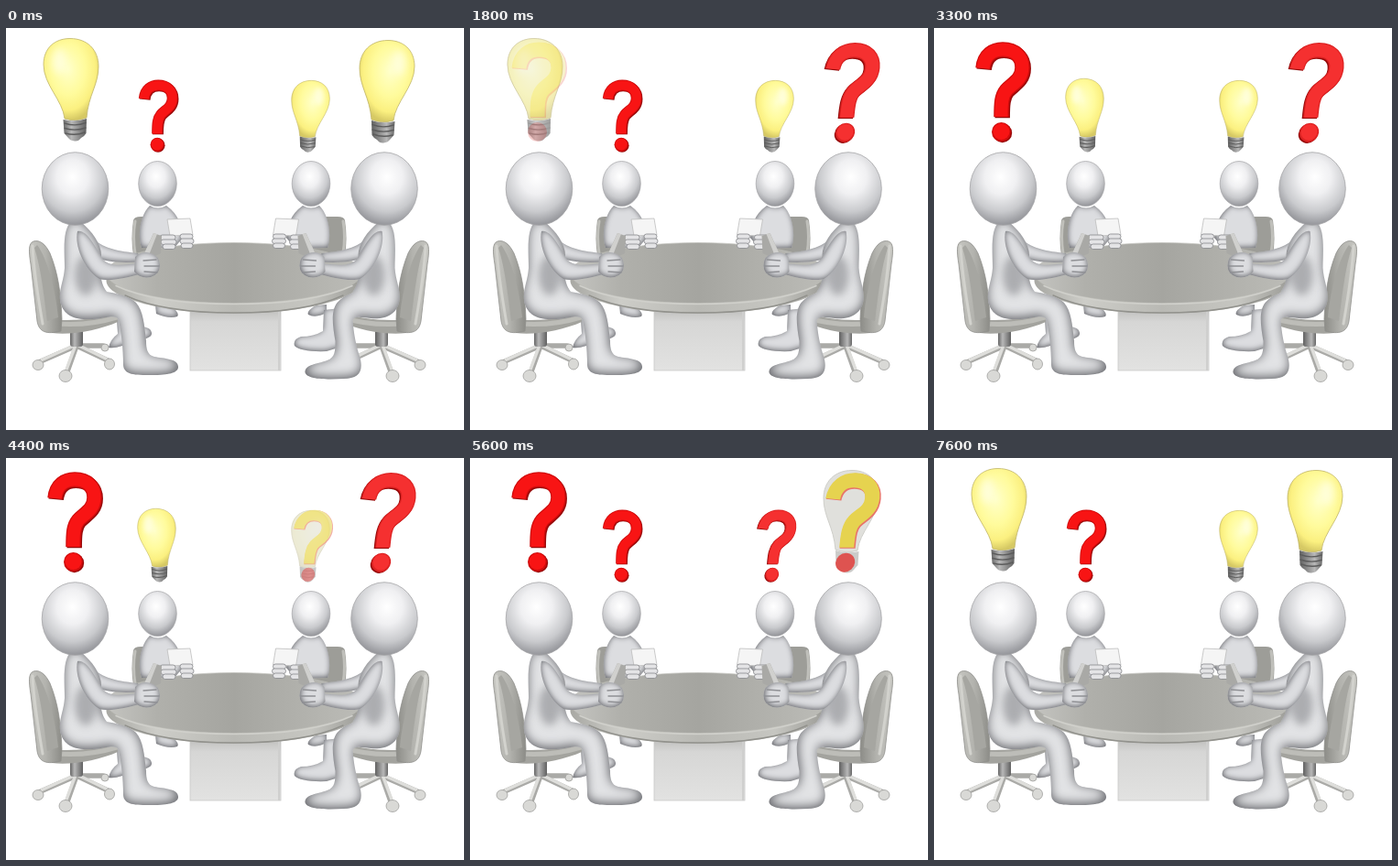
An HTML page that plays this animation: 500 by 439 pixels, repeating every 8600 ms.

```html
<!DOCTYPE html>
<html lang="en">
<head>
<meta charset="utf-8">
<title>Meeting</title>
<style>
html, body { margin: 0; width: 100%; height: 100%; overflow: hidden; background: #fff; }
svg { display: block; width: 100vw; height: 100vh; }
.skin { fill: #e2e3e5; filter: url(#round); }
.small { fill: #dcdde0; filter: url(#roundS); }
.line { fill: none; stroke-linecap: round; }
.fingers { fill: #e4e4e6; stroke: #8f9094; stroke-width: .9; }
.left { --red: #f81414; --edge: #d00c0c; --dx: 1.2px; }
.right { --red: #f53030; --edge: #dc2222; --dx: -1.2px; }
.depth { transform: translate(var(--dx), 1.2px); }
</style>
</head>
<body>
<svg viewBox="0 0 500 439">
<defs>
  <!-- inner shading that makes flat shapes look round -->
  <filter id="round" x="-10%" y="-10%" width="120%" height="120%" color-interpolation-filters="sRGB">
    <feGaussianBlur in="SourceAlpha" stdDeviation="6"/>
    <feOffset dx="-1" dy="-2" result="b"/>
    <feFlood flood-color="#5a5b60"/>
    <feComposite operator="out" in2="b"/>
    <feComposite operator="in" in2="SourceAlpha" result="e"/>
    <feMerge><feMergeNode in="SourceGraphic"/><feMergeNode in="e"/></feMerge>
  </filter>
  <filter id="roundS" x="-10%" y="-10%" width="120%" height="120%" color-interpolation-filters="sRGB">
    <feGaussianBlur in="SourceAlpha" stdDeviation="3"/>
    <feOffset dx="-.5" dy="-1.5" result="b"/>
    <feFlood flood-color="#5a5b60"/>
    <feComposite operator="out" in2="b"/>
    <feComposite operator="in" in2="SourceAlpha" result="e"/>
    <feMerge><feMergeNode in="SourceGraphic"/><feMergeNode in="e"/></feMerge>
  </filter>
  <filter id="blur" x="-60%" y="-60%" width="220%" height="220%"><feGaussianBlur stdDeviation="4"/></filter>
  <radialGradient id="head" cx=".46" cy=".34" r=".68">
    <stop stop-color="#fff"/><stop offset=".35" stop-color="#f0f0f2"/>
    <stop offset=".7" stop-color="#c9cacd"/><stop offset="1" stop-color="#8e8f94"/>
  </radialGradient>
  <radialGradient id="glass" cx=".45" cy=".38" r=".62">
    <stop stop-color="#ffffc8"/><stop offset=".5" stop-color="#fffb9c"/>
    <stop offset=".8" stop-color="#fbf080"/><stop offset="1" stop-color="#d6c964"/>
  </radialGradient>
  <linearGradient id="metal">
    <stop stop-color="#666"/><stop offset=".35" stop-color="#b8b8b8"/><stop offset="1" stop-color="#606060"/>
  </linearGradient>
  <linearGradient id="chair">
    <stop stop-color="#c6c6c1"/><stop offset=".5" stop-color="#b3b3ae"/><stop offset="1" stop-color="#8c8c87"/>
  </linearGradient>
  <linearGradient id="top">
    <stop stop-color="#c4c4c0"/><stop offset=".2" stop-color="#b0b0ab"/>
    <stop offset=".5" stop-color="#a5a5a0"/><stop offset="1" stop-color="#bcbcb7"/>
  </linearGradient>
  <linearGradient id="rim">
    <stop stop-color="#a8a8a3"/><stop offset=".2" stop-color="#cdcdc8"/><stop offset=".5" stop-color="#b9b9b4"/>
    <stop offset=".8" stop-color="#c6c6c1"/><stop offset="1" stop-color="#9c9c97"/>
  </linearGradient>
  <linearGradient id="post" x2="0" y2="1">
    <stop stop-color="#bdbdbb"/><stop offset=".22" stop-color="#d6d6d5"/><stop offset="1" stop-color="#e2e2e1"/>
  </linearGradient>

  <path id="outline" d="M70 11.500C89 11.500 101 24 101 42C101 62 90 73 88 98Q76 103 64 99C62 79 41 62 41 40C41 22 53 11.500 70 11.500Z"/>
  <path id="screw" d="M62.500 100Q76 103 88 99L87.500 115Q85 119 82 120Q79 124 75 123.500Q70 123 68 120L63.500 115Z"/>
  <path id="hook" d="M53.500 44C55 29 65 23.500 75 23.500C89 23.500 96.500 32 96.500 43C96.500 57 85 61 79 68C74 74 73.500 82 73.500 97"/>

  <g id="bulb">
    <use href="#outline" fill="url(#glass)" stroke="#bfb468" stroke-width=".8"/>
    <ellipse cx="58" cy="36" rx="8" ry="14" fill="#fffff0" opacity=".65" filter="url(#blur)"/>
    <use href="#screw" fill="url(#metal)"/>
    <path class="line" d="M64 104Q76 108 87 103.500M64 109.500Q76 113 87 109M65 115Q76 118 86 114" stroke="#5c5c5c" stroke-width="1.400"/>
  </g>
  <g id="ask">
    <g class="depth" fill="#970a0a" stroke="#970a0a">
      <use href="#hook" fill="none" stroke-width="16.500"/><circle cx="73.500" cy="113.500" r="10.500" stroke="none"/>
    </g>
    <use href="#hook" fill="none" stroke="var(--edge)" stroke-width="16.500"/>
    <use href="#hook" fill="none" stroke="var(--red)" stroke-width="14"/>
    <circle cx="73.500" cy="113.500" r="10.500" fill="var(--edge)"/><circle cx="73.500" cy="113" r="9" fill="var(--red)"/>
  </g>
  <g id="ghostBulb">
    <use href="#outline" fill="#e0e0dc" stroke="#cfcfca"/><use href="#screw" fill="#cbcbc9"/>
  </g>
  <g id="ghostAsk">
    <use href="#hook" fill="none" stroke="#e8746a" stroke-width="17" transform="translate(1 1)"/>
    <use href="#hook" fill="none" stroke="#e6d34f" stroke-width="16"/>
    <circle cx="73.500" cy="113.500" r="10.500" fill="#de5350"/>
  </g>

  <g id="backChair">
    <path d="M139 210Q140 206 147 206L176 206Q180 230 178 248L139 248Q136 230 139 210Z" fill="#9d9d98"/>
    <path d="M141 211Q138 228 141 246" class="line" stroke="#c0c0bb" stroke-width="3"/>
  </g>
  <g id="backBody" class="small">
    <path d="M157 194Q166 199 175 194Q185 201 189 211L193 229L183 241L148 240C143 226 147 203 157 194Z"/>
  </g>
  <g id="backHands">
    <path d="M176 209L201 208L204 226L179 227Z" fill="#f5f5f5" stroke="#bdbdbd" stroke-width=".8"/>
    <g class="fingers">
      <rect x="168" y="226" width="17" height="5.500" rx="2.700"/><rect x="169" y="231" width="17" height="5.500" rx="2.700"/>
      <rect x="171" y="236" width="14" height="5.500" rx="2.700"/><rect x="190" y="225" width="14" height="5.500" rx="2.700"/>
      <rect x="190" y="230" width="15" height="5.500" rx="2.700"/><rect x="191" y="235" width="13" height="5.500" rx="2.700"/>
    </g>
  </g>

  <g id="seat">
    <g class="line" stroke="#aaaaa7" stroke-width="5.500">
      <path d="M77 347L38 364M77 347L67 375M77 347L111 363M77 347L106 347"/>
      <path d="M76 346L39 362.500M76 346L66 373M78 346L110 361.500" stroke="#dededb" stroke-width="3.500"/>
    </g>
    <g fill="#d9d9d6" stroke="#a0a09d" stroke-width=".8">
      <ellipse cx="35" cy="368" rx="6" ry="5.500"/><ellipse cx="65" cy="380" rx="7" ry="6.500"/>
      <ellipse cx="113" cy="367" rx="5.500" ry="6"/><ellipse cx="108" cy="349" rx="4" ry="4"/>
    </g>
    <rect x="70" y="328" width="14" height="20" rx="3" fill="url(#metal)"/>
    <path d="M40 317C70 322 100 317 122 311L122 321C102 330 70 336 50 333Z" fill="#a3a39e"/>
    <path d="M46 322Q85 327 121 316" class="line" stroke="#bdbdb8" stroke-width="5"/>
    <path d="M30 233C24 235 25 245 27 258L34 320C36 332 44 335 60 331L61 318C60 290 57 268 48 246C43 236 37 231 30 233Z" fill="url(#chair)" stroke="#8f8f8b" stroke-width=".8"/>
    <path d="M34 237C43 248 54 282 57 316L45 320C41 288 38 262 31 240Z" fill="#a6a6a1"/>
    <path d="M29 238C30 262 36 300 40 323" class="line" stroke="#d2d2cd" stroke-width="3"/>
  </g>
  <g id="farArm">
    <path class="small" d="M92 226C102 239 116 243 144 246L148 255C130 257 110 256 96 250Z"/>
    <path d="M161 224L170 227L169 246L157 252L151 246Z" fill="#a9a9a6"/>
    <path d="M161 224L165 225L156 248L151 246Z" fill="#d0d0ce"/>
  </g>
  <path id="torso" d="M72 211C61 219 64 244 64 262C63 278 56 288 60 302C66 318 92 317 106 312L110 288C102 278 102 262 104 248C104 236 94 222 82 212Z"/>
  <g id="upper">
    <ellipse cx="87" cy="270" rx="12" ry="22" fill="#77787d" opacity=".5" filter="url(#blur)"/>
    <path class="small" d="M78 222C88 220 97 238 106 253C115 262 130 258 146 257L148 268C132 273 112 277 102 274C88 266 74 240 78 222Z"/>
    <path class="small" d="M141 250Q148 243 158 246Q168 249 168 259Q168 269 158 272Q146 274 140 266Z"/>
    <path class="line" d="M150 254L164 253M151 260L167 260M151 266L165 267" stroke="#8f9094" stroke-width="1.300"/>
    <ellipse cx="75.500" cy="175.500" rx="36.300" ry="39.800" fill="url(#head)" stroke="#a5a5a8" stroke-width=".8"/>
  </g>
</defs>

<rect width="500" height="439" fill="#fff"/>

<use href="#backChair"/><use href="#backChair" transform="matrix(-1 0 0 1 509 0)"/>
<use href="#backBody"/><use href="#backBody" transform="matrix(-1 0 0 1 499 0)"/>
<g fill="url(#head)" stroke="#a5a5a8" stroke-width=".7">
  <ellipse cx="165.500" cy="170" rx="20.800" ry="24.500"/><ellipse cx="333" cy="170" rx="20.800" ry="24.500"/>
</g>

<path class="small" d="M163 302L180 304Q190 311 187 315Q178 318 164 312Z"/>
<path class="small" d="M350 302L338 303Q328 309 330 313Q338 317 350 311Z"/>
<path class="small" d="M120 304L146 306L147 326Q160 327 159 334Q158 340 140 341Q122 351 112 349Q114 340 122 334Z"/>
<path class="small" d="M365 306L347 308L346 331Q336 337 322 337Q313 340 315 347Q322 354 350 353L366 348Z"/>
<rect x="201" y="306" width="99" height="68" fill="url(#post)" stroke="#c8c8c7" stroke-width=".8"/>
<path d="M298 308V374" stroke="#cfcfce" stroke-width="2"/>
<path d="M109.500 269V276C109.500 295 172 312 249 312S388.500 295 388.500 276V269Z" fill="url(#rim)"/>
<ellipse cx="249" cy="267.500" rx="139.500" ry="33" fill="url(#top)" stroke="#bdbdb8" stroke-width=".7"/>
<path d="M120 281.500C150 295.500 198 301.500 249 301.500S348 295.500 378 281.500" class="line" stroke="#d0d0cb" stroke-width="1.500"/>
<path d="M130 292C160 306 200 311 249 311S338 306 368 292" class="line" stroke="#92928d" stroke-width="1.500"/>
<use href="#backHands"/><use href="#backHands" transform="matrix(-1 0 0 1 495.500 0)"/>

<use href="#seat"/><use href="#farArm"/>
<g class="skin">
  <use href="#torso"/>
  <path d="M64 288C54 304 66 319 90 318C108 318 119 311 123 319C126 334 128 350 128 368C129 379 140 379 160 379C176 379 188 377 188 370C188 361 172 361 162 359C154 357 153 350 153 342C151 325 150 309 142 300C130 289 112 290 100 285Z"/>
</g>
<use href="#upper"/>

<g transform="matrix(-1 0 0 1 488.500 0)">
  <use href="#seat" x="1.500"/><use href="#farArm"/>
  <g class="skin">
    <use href="#torso"/>
    <path d="M64 288C54 304 66 319 90 317C102 316 107 314 110 319C109 334 106 348 102 360C98 376 104 383 120 383C138 384 160 384 162 376C162 367 148 367 138 363C129 360 129 352 129 342C132 325 134 309 127 300C118 290 110 290 100 285Z"/>
  </g>
  <use href="#upper"/>
</g>
<g id="icons"></g>
</svg>
<script>
// transforms per person: [bulb, question mark]
const places = [
  ['1 0 0 1 0 0', '1 0 0 1 0 0'],
  ['.694 0 0 .717 115.2 47', '.72 0 0 .72 112.2 45.6'],
  ['-.694 0 0 .7 381.8 49.3', '.71 0 -.06 .72 284.4 45.6'],
  ['-1 0 0 1 487 2', '1 0 -.093 1 346.7 .7']
];
const start = [1, 0, 1, 1];  // 1 = bulb, 0 = question mark
// [person, first step in ms, steps, new state]
const fades = [
  [3, 100, 8, 0], [0, 1800, 7, 0], [1, 2600, 8, 1], [2, 4300, 7, 0],
  [1, 5000, 6, 0], [3, 5400, 6, 1], [0, 5700, 3, 1], [2, 6900, 8, 1]
];
const LOOP = 8600, STEP = 100;

const use = (id, m) => `<use href="#${id}" transform="matrix(${m})"/>`;
const root = document.getElementById('icons');
root.innerHTML = places.map(([b, q], i) =>
  `<g class="${i < 2 ? 'left' : 'right'}">${use('ask', q)}</g>` +
  `<g>${use('bulb', b)}</g><g>${use('ghostBulb', b)}${use('ghostAsk', q)}</g>`).join('');
const layers = [...root.children];
const t0 = performance.now();

function draw(now) {
  const t = Math.max(0, now - t0) % LOOP, state = [...start];
  for (const [who, from, steps, to] of fades) {
    const p = Math.min(1, (Math.floor((t - from) / STEP) + 1) / steps);
    if (p > 0) state[who] = to ? p : 1 - p;
  }
  state.forEach((v, i) => {
    [1 - 2 * v, 2 * v - 1, 1 - Math.abs(2 * v - 1)].forEach((o, k) => {
      layers[i * 3 + k].setAttribute('opacity', Math.max(0, o));
    });
  });
  requestAnimationFrame(draw);
}
draw(t0);
</script>
</body>
</html>
```
